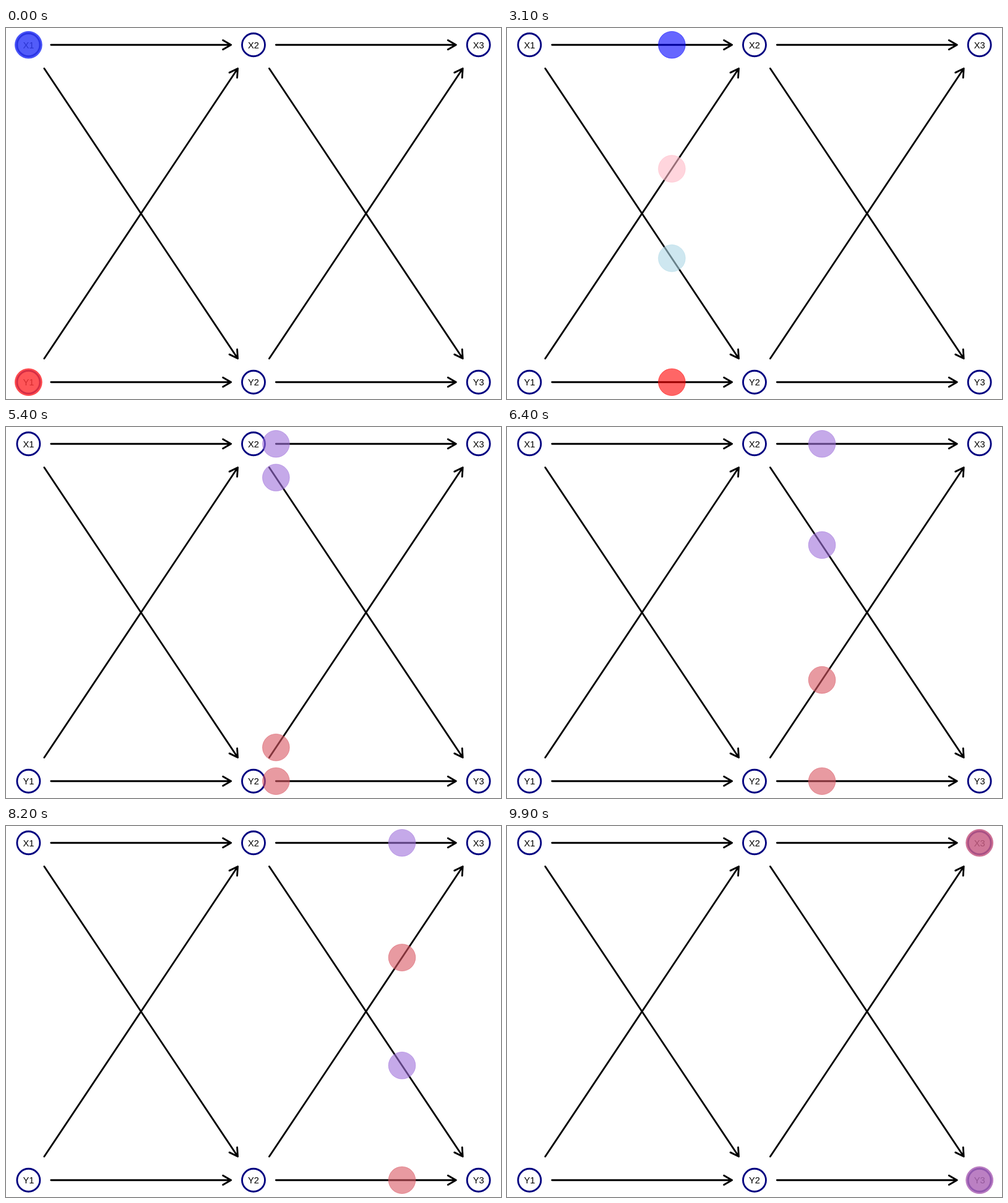
Recreate the animation shown at these times as an HTML page. Size 800x600 px, loop 10000 ms.

```html
<!DOCTYPE html>
<html lang="en">
<head>
<meta charset="utf-8">
<title>Cross-lagged paths</title>
<style>
  html, body { margin: 0; width: 100%; height: 100%; overflow: hidden; background: #fff; }
  svg { display: block; width: 100vw; height: 100vh; }
  text { font: 14.7px "Liberation Sans", Arial, sans-serif; text-anchor: middle; }
  .arrow { fill: none; stroke: #000; stroke-width: 2.85; stroke-linecap: round; stroke-linejoin: round; }
  .node { fill: #fff; stroke: #000080; stroke-width: 2.85; }
  .dot { fill-opacity: .6; stroke-opacity: .6; stroke-width: .9; }
</style>
</head>
<body>
<svg id="stage" viewBox="0 0 800 600"></svg>
<script>
const stage = document.getElementById('stage');
const columns = [36.36, 400, 763.64];
const rows = [27.27, 572.73];
const FRAME = 100, FRAMES = 100, MIDDLE = 49;

function add(tag, attrs, text = '') {
  const el = document.createElementNS('http://www.w3.org/2000/svg', tag);
  for (const key in attrs) el.setAttribute(key, attrs[key]);
  el.textContent = text;
  stage.append(el);
  return el;
}

const mix = (a, b, t) => a + (b - a) * t;

// Arrow between two nodes, shortened at both ends by the share `gap`.
function arrow(x1, y1, x2, y2, gap) {
  const sx = mix(x1, x2, gap), sy = mix(y1, y2, gap);
  const ex = mix(x2, x1, gap), ey = mix(y2, y1, gap);
  const angle = Math.atan2(ey - sy, ex - sx);
  const barb = side => {
    const a = angle + side * Math.PI / 6;
    return `${ex - 15 * Math.cos(a)} ${ey - 15 * Math.sin(a)}`;
  };
  add('path', { class: 'arrow', d: `M${sx} ${sy}L${ex} ${ey}M${barb(1)}L${ex} ${ey}L${barb(-1)}` });
}

for (const i of [0, 1]) {
  for (const from of rows) {
    for (const to of rows) {
      arrow(columns[i], from, columns[i + 1], to, from === to ? 0.1 : 0.07);
    }
  }
}

columns.forEach((x, i) => rows.forEach((y, j) => {
  add('circle', { class: 'node', cx: x, cy: y, r: 18.5 });
  add('text', { x, y: y + 5.3 }, 'XY'[j] + (i + 1));
}));

// Start row, end row, and colour on each half of the way.
const dots = [
  { from: 0, to: 1, colors: ['#add8e6', '#9f70db'] },
  { from: 1, to: 0, colors: ['#ffb9c6', '#d95763'] },
  { from: 0, to: 0, colors: ['#0000ff', '#9f70db'] },
  { from: 1, to: 1, colors: ['#ff0000', '#d95763'] }
];
// The crossing dots end above or below the level ones depending on their layer.
for (const dot of dots) dot.el = add('circle', { class: 'dot', r: 21.8 });

function draw(ms) {
  const frame = Math.floor(ms / FRAME) % FRAMES;
  const half = frame > MIDDLE ? 1 : 0;
  const t = half ? (frame - MIDDLE) / (FRAMES - 1 - MIDDLE) : frame / MIDDLE;
  const x = mix(columns[half], columns[half + 1], t);
  const order = half ? [2, 3, 0, 1] : [0, 1, 2, 3];
  for (const i of order) {
    const { from, to, colors, el } = dots[i];
    el.setAttribute('cx', x);
    el.setAttribute('cy', mix(rows[from], rows[to], t));
    el.setAttribute('fill', colors[half]);
    el.setAttribute('stroke', colors[half]);
    stage.append(el);
  }
}

const start = performance.now();
function tick() {
  draw(performance.now() - start);
  requestAnimationFrame(tick);
}
draw(0);
requestAnimationFrame(tick);
</script>
</body>
</html>
```
